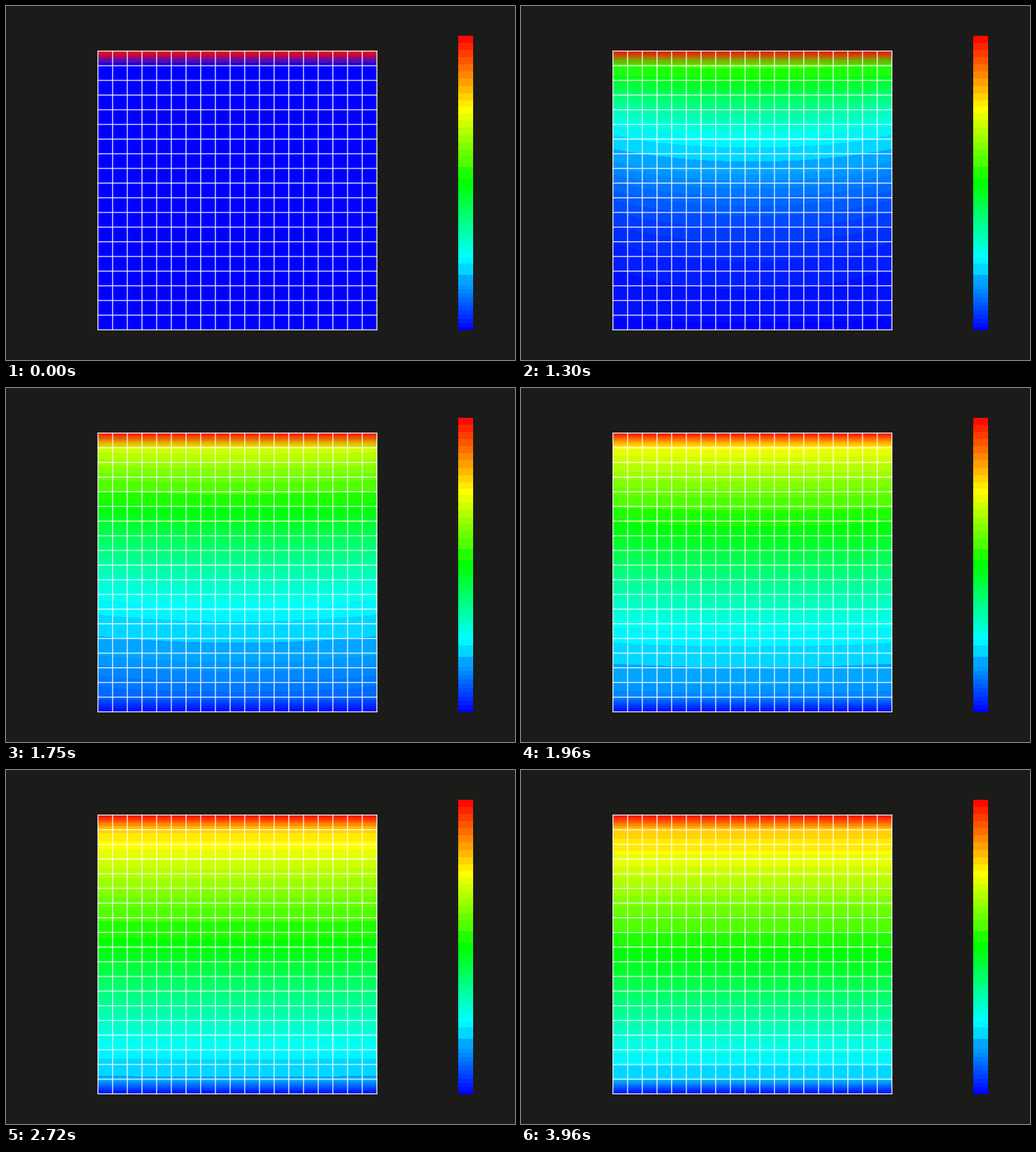
Write a matplotlib script that moves like this. It is 717 by 499 pixels and loops after 4 s.

```python
import numpy as np
import matplotlib.pyplot as plt
from matplotlib.animation import FuncAnimation
from matplotlib.collections import LineCollection

W, H, DPI = 717, 499, 64
LOOP, TICK = 4000, 20          # ms
START, STEP = 1120, 30.9       # first change and time per solver step, ms

CELLS = 19
NODES = CELLS + 1
X0, Y0, SIDE = 129, 63, 394    # plate in pixels
PITCH = (SIDE - 1) / CELLS

FOURIER = 4.75                 # diffusion number per step
CONTACT = 0.185                # conductance to the hot and cold edges
EDGE_RATE = 0.1                # slower vertical conduction at the sides
SPREAD = 0.7                   # sideways conduction
SUBSTEPS = 3


def laplacian(n, end):
    """Chain of n nodes; `end` is the conductance out of both ends."""
    m = 2 * np.eye(n) - np.eye(n, k=1) - np.eye(n, k=-1)
    m[0, 0] = m[-1, -1] = 1 + end
    return m


def solve(steps):
    """Implicit heat conduction: top row held at 1, bottom row at 0."""
    rows = NODES - 2
    rate = np.ones(NODES)
    rate[[0, -1]] = EDGE_RATE
    op = (np.kron(laplacian(rows, CONTACT), np.diag(rate))
          + SPREAD * np.kron(np.eye(rows), laplacian(NODES, 0)))
    k = FOURIER / SUBSTEPS
    inv = np.linalg.inv(np.eye(rows * NODES) + k * op)
    source = np.zeros((rows, NODES))
    source[0] = k * CONTACT * rate
    temp = np.zeros(rows * NODES)
    states = []
    for _ in range(steps + 1):
        field = np.zeros((NODES, NODES))
        field[0] = 1
        field[1:-1] = temp.reshape(rows, NODES)
        states.append(field)
        for _ in range(SUBSTEPS):
            temp = inv @ (temp + source.ravel())
    return states


def ramp(v):
    """Blue, cyan, green, yellow, red."""
    stops = np.linspace(0, 1, 5)
    channels = ([0, 0, 0, 255, 255], [0, 255, 255, 255, 0], [255, 255, 0, 0, 0])
    return np.stack([np.interp(v, stops, c) for c in channels], axis=-1)


def nearest(c, levels):
    levels = np.asarray(levels, float)
    return levels[np.searchsorted((levels[1:] + levels[:-1]) / 2, c)]


RED = [0, 30, 80, 105, 130, 155, 180, 205, 230, 255]
WARM = [*range(10, 250, 25), 255]
COLD = [*range(0, 166, 15), 215, 245, 255]
BLUE = range(0, 256, 15)


def band(rgb):
    """Reduce smooth colour to the coarse steps of the legend."""
    r, g, b = np.moveaxis(rgb, -1, 0)
    cold = (b > 200) & (r < 64)
    green = np.where(cold, nearest(g, COLD), nearest(g, WARM))
    out = np.stack([nearest(r, RED), green, nearest(b, BLUE)], axis=-1)
    return out.astype(np.uint8)


# Weights that blend node colours across the pixels of the plate
pos = np.arange(SIDE) / PITCH
BLEND = np.clip(1 - np.abs(pos[:, None] - np.arange(NODES)), 0, 1)


def paint(field):
    colour = np.moveaxis(ramp(field), -1, 0)
    return band(np.moveaxis(BLEND @ colour @ BLEND.T, 0, -1))


STATES = solve(int((LOOP - START) / STEP) + 1)

fig = plt.figure(figsize=(W / DPI, H / DPI), dpi=DPI, facecolor="#1b1b19")
ax = fig.add_axes([0, 0, 1, 1])
ax.axis("off")

plate = ax.imshow(paint(STATES[0]), interpolation="nearest",
                  extent=(X0, X0 + SIDE, Y0 + SIDE, Y0))
legend = band(ramp(np.linspace(1, 0, 415)))[:, None]
ax.imshow(legend, interpolation="nearest", extent=(637, 658, 457, 42))

lines = np.arange(NODES) * PITCH
left, top = X0 + 0.5, Y0 + 0.5
right, bottom = left + lines[-1], top + lines[-1]
mesh = ([[(left + d, top), (left + d, bottom)] for d in lines]
        + [[(left, top + d), (right, top + d)] for d in lines])
ax.add_collection(LineCollection(mesh, colors="white", snap=False,
                                 linewidths=1.2 * 72 / DPI,
                                 capstyle="projecting"))
ax.set(xlim=(0, W), ylim=(H, 0), aspect="auto")


def draw(i):
    t = i * TICK
    n = 0 if t < START else 1 + int((t + TICK / 2 - START) // STEP)
    plate.set_data(paint(STATES[n]))
    return plate,


anim = FuncAnimation(fig, draw, frames=LOOP // TICK, interval=TICK,
                     repeat=True, repeat_delay=0)
plt.show()
```
